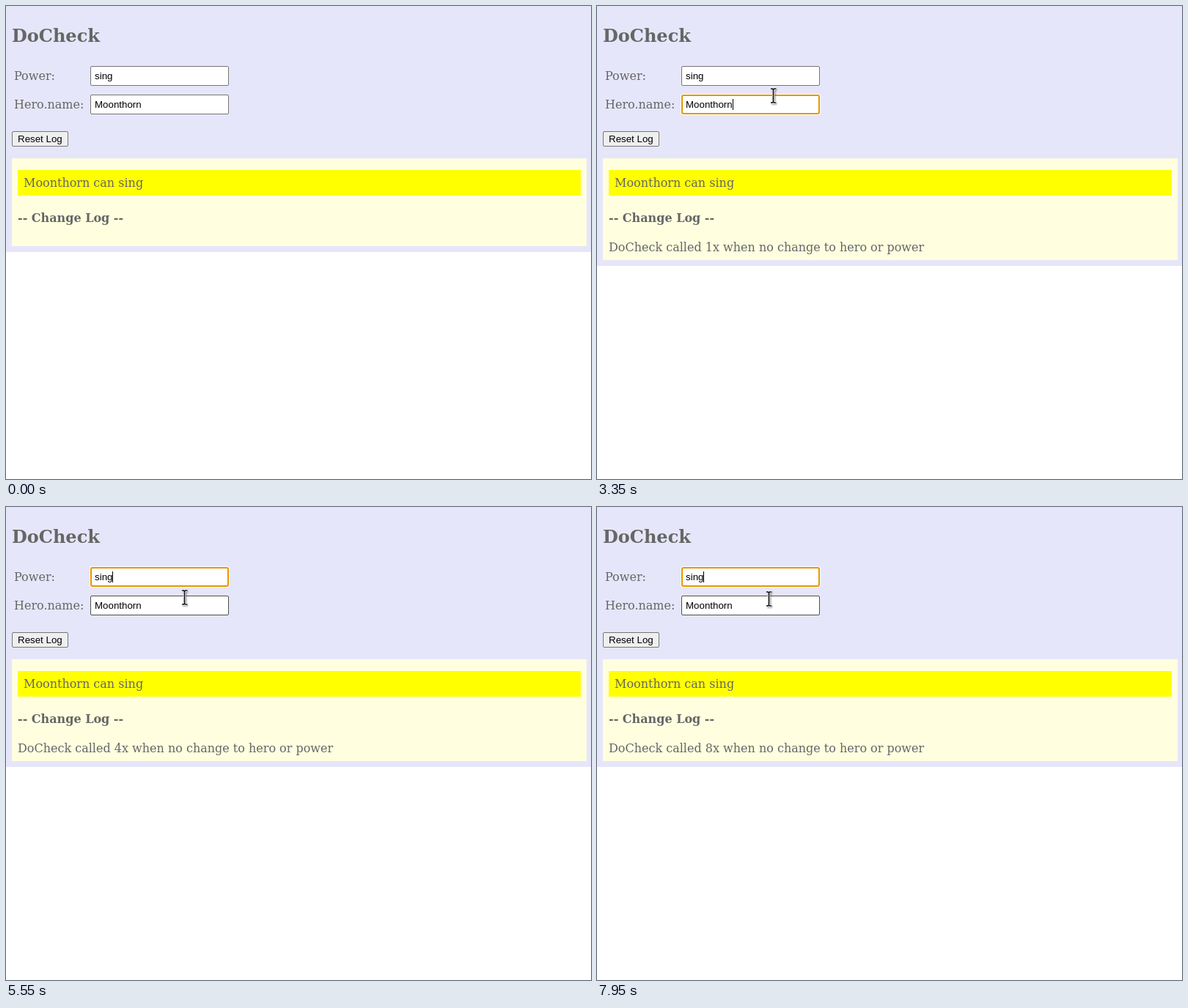
Recreate the animation shown at these times as an HTML page with a canvas. Size 798 by 646 pixels, loop 8000 ms.

```html
<!DOCTYPE html>
<html lang="en">
<head>
<meta charset="utf-8">
<title>DoCheck</title>
<style>
html, body { margin: 0; width: 100%; height: 100%; overflow: hidden; background: #fff; }
body { position: relative; color: #666; font: 16px "DejaVu Serif", serif; }
body * { position: absolute; box-sizing: border-box; white-space: pre; margin: 0; }
canvas { left: 0; top: 0; }
#parent { left: 0; top: 0; width: 798px; background: lavender; }
#hero { left: 8px; top: 208px; width: 784px; background: lightyellow; }
#summary { left: 16px; top: 224px; width: 768px; height: 35px; padding: 8px; background: yellow; }
h2 { left: 8px; top: 26px; font-size: 24px; }
h4 { left: 16px; top: 280px; font-size: 16px; }
#log { left: 16px; top: 320px; }
.label { left: 11px; }
.field { left: 115px; width: 189px; height: 27px; background: #fff; border: 1px solid #767676; border-radius: 2px; }
.field.hover { border-color: #4f4f4f; }
.field.focus { border: 2px solid #e59700; border-radius: 3px; box-shadow: 0 0 0 1px #fff; }
.value, #reset { font: 13.3333px "Liberation Sans", Arial, sans-serif; color: #000; }
.value { left: 121px; }
#reset { left: 8px; top: 171px; width: 77px; height: 21px; padding: 2px 0 0 7px; background: #efefef; border: 1px solid #767676; border-radius: 2px; }
#caret { width: 1px; height: 15px; background: #000; }
</style>
</head>
<body>
<div id="parent"></div>
<h2>DoCheck</h2>
<div class="label" style="top:86px">Power:</div>
<div class="label" style="top:125px">Hero.name:</div>
<div class="field" id="power" style="top:82px"></div>
<div class="field" id="name" style="top:121px"></div>
<div class="value" style="top:88px">sing</div>
<div class="value" style="top:127px">Moonthorn</div>
<div id="caret"></div>
<div id="reset">Reset Log</div>
<div id="hero"></div>
<div id="summary">Moonthorn can sing</div>
<h4>-- Change Log --</h4>
<div id="log"></div>
<canvas id="pointer" width="798" height="646"></canvas>
<script>
const LOOP = 8000, STEP = 50;
const clicks = [2200, 3050, 3700, 4400, 5100, 5800, 6400, 6950, 7600];

const $ = id => document.getElementById(id);
const ctx = $("pointer").getContext("2d");
const fields = [{ el: $("power"), top: 82, caretX: 145 }, { el: $("name"), top: 121, caretX: 185 }];
const arrow = new Path2D("M0 0V19.5L4.5 15.3L7.8 22.5L10.6 21.2L7.4 14.4H12.8Z");
const beam = new Path2D("M-3.5 -9.5H-1.5L0 -8.5L1.5 -9.5H3.5M0 -8.5V8.5M-3.5 9.5H-1.5L0 8.5L1.5 9.5H3.5");

const move = (start, duration, x, y) => ({ start, duration, x, y });

// The pointer enters, then shuttles between the fields ahead of each click.
const moves = [
  move(350, 250, 471, 393),
  move(800, 250, 303, 232),
  move(1150, 100, 286, 206),
  move(1250, 650, 267, 93)
];
[...clicks, LOOP + 200].forEach((time, i) => {
  if (i === 0) return;
  const x = 239 + 6.5 * Math.sin((i - 1) * 0.68);
  const y = i % 2 ? 136 : 87 + 2 * i;
  moves.push(move(time - 440, 280, x, y));
});

function pointerAt(t) {
  let x = 860, y = 690;
  for (const m of moves) {
    const u = Math.min(1, Math.max(0, (t - m.start) / m.duration));
    x += (m.x - x) * u;
    y += (m.y - y) * u;
  }
  return [Math.round(x), Math.round(y)];
}

function drawPointer(x, y, overField) {
  ctx.clearRect(0, 0, 798, 646);
  ctx.save();
  ctx.lineJoin = "round";
  ctx.shadowColor = "rgba(0,0,0,.45)";
  ctx.shadowBlur = 2;
  ctx.shadowOffsetX = ctx.shadowOffsetY = 1;
  ctx.strokeStyle = "#fff";
  if (overField) {
    ctx.translate(x + 0.5, y + 0.5);
    ctx.lineWidth = 3.6;
    ctx.stroke(beam);
    ctx.shadowColor = "transparent";
    ctx.strokeStyle = "#111";
    ctx.lineWidth = 1.7;
    ctx.stroke(beam);
  } else {
    ctx.translate(x - 0.8, y - 3.2);
    ctx.lineWidth = 2.6;
    ctx.stroke(arrow);
    ctx.shadowColor = "transparent";
    ctx.fillStyle = "#111";
    ctx.fill(arrow);
  }
  ctx.restore();
}

function render(t) {
  const count = clicks.filter(c => c <= t).length;
  const focused = count ? fields[(count + 1) % 2] : null;
  const [x, y] = pointerAt(t);
  const hovered = fields.find(f => x >= 115 && x < 304 && y >= f.top && y < f.top + 27);

  for (const f of fields) {
    f.el.classList.toggle("focus", f === focused);
    f.el.classList.toggle("hover", f === hovered);
  }
  $("caret").hidden = !focused;
  if (focused) {
    $("caret").style.left = focused.caretX + "px";
    $("caret").style.top = focused.top + 6 + "px";
  }

  const logged = count > 1;
  $("log").textContent = logged ? `DoCheck called ${count - 1}x when no change to hero or power` : "";
  $("hero").style.height = (logged ? 139 : 120) + "px";
  $("parent").style.height = (logged ? 355 : 336) + "px";
  drawPointer(x, y, !!hovered);
}

const start = performance.now();
function tick() {
  const t = (performance.now() - start) % LOOP;
  render(Math.floor(t / STEP) * STEP);
  requestAnimationFrame(tick);
}
tick();
</script>
</body>
</html>
```
